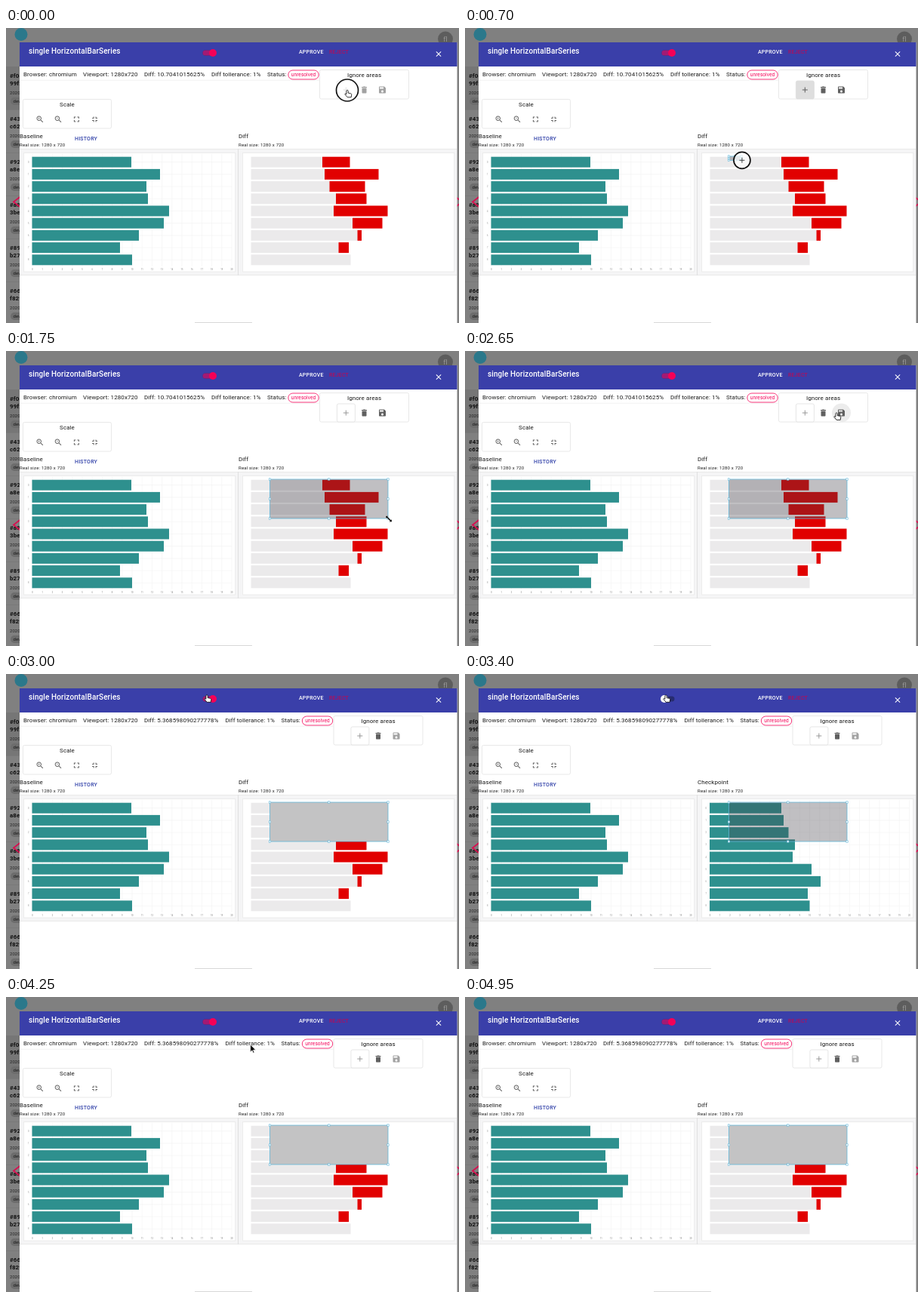
These frames come from a looping animation (600x391 px, 5050 ms). An HTML page:

```html
<!DOCTYPE html>
<html>
<head>
<meta charset="utf-8">
<style>
  html, body { margin: 0; width: 100%; height: 100%; overflow: hidden; background: #808080; }
  svg { display: block; width: 600px; height: 391px; font-family: Roboto, sans-serif; }
</style>
</head>
<body>
<svg viewBox="0 0 600 391"><g id="page"></g><g id="live"></g></svg>
<script>
const LOOP = 5050, STEP = 50;
const PINK = '#f50057', TEAL = '#2e908e', SHIFT = 18.5, RIGHT = 289.5;
const BASELINE = [166, 204, 186, 188, 216, 209, 176, 151, 167];
const CHECKPOINT = [129.5, 132.5, 139, 147.5, 144.5, 169.5, 181.5, 164.5, 167];

const LENS = 'M15.5 14h-.79l-.28-.27C15.41 12.59 16 11.11 16 9.5 16 5.91 13.09 3 9.5 3S3 5.91 3 9.5 5.91 16 9.5 16c1.61 0 3.09-.59 4.23-1.57l.27.28v.79l5 4.99L20.49 19l-4.99-5zm-6 0C7.01 14 5 11.99 5 9.5S7.01 5 9.5 5 14 7.01 14 9.5 11.99 14 9.5 14z';
const ICONS = {
  add: 'M19 13h-6v6h-2v-6H5v-2h6V5h2v6h6v2z',
  trash: 'M6 19c0 1.1.9 2 2 2h8c1.1 0 2-.9 2-2V7H6v12zM19 4h-3.5l-1-1h-5l-1 1H5v2h14V4z',
  save: 'M17 3H5c-1.11 0-2 .9-2 2v14c0 1.1.89 2 2 2h14c1.1 0 2-.9 2-2V7l-4-4zm-5 16c-1.66 0-3-1.34-3-3s1.34-3 3-3 3 1.34 3 3-1.34 3-3 3zm3-10H5V5h10v4z',
  zoomIn: LENS + 'M12 10h-2v2H9v-2H7V9h2V7h1v2h2v1z',
  zoomOut: LENS + 'M7 9h5v1H7z',
  expand: 'M7 14H5v5h5v-2H7v-3zm-2-4h2V7h3V5H5v5zm12 7h-3v2h5v-5h-2v3zM14 5v2h3v3h2V5h-5z',
  shrink: 'M5 16h3v3h2v-5H5v2zm3-8H5v2h5V5H8v3zm6 11h2v-3h3v-2h-5v5zm2-11V5h-2v5h5V8h-3z',
  close: 'M19 6.41L17.59 5 12 10.59 6.41 5 5 6.41 10.59 12 5 17.59 6.41 19 12 13.41 17.59 19 19 17.59 13.41 12z'
};
const CURSORS = {
  hand: '<path d="M0 0c1 0 1.2.6 1.2 1.2v2.4l3.4.7c.9.2 1.2.8 1.1 1.6l-.5 3.4H.2L-3 5.6c-.4-.6.3-1.4 1-1l.9.7V1.2C-1.1.6-.9 0 0 0z" fill="#fff" stroke="#000" stroke-width=".8"/>',
  arrow: '<path d="M0 0v10l2.3-2.2 1.5 3.5 1.5-.6-1.5-3.4h3.2z" stroke="#fff" stroke-width=".7"/>',
  cross: '<path d="M-3.5 0h7M0-3.5v7" stroke="#333" stroke-width=".9"/>',
  resize: '<path d="M-4-4h3.6l-1.2 1.2 4.4 4.4L4 .4V4H.4l1.2-1.2-4.4-4.4L-4-.4z" stroke="#fff" stroke-width=".4"/>'
};

// [time, x, y] and [start time, shape]
const PATH = [[0, 452, 82.5], [150, 452, 82.5], [550, 349, 170], [600, 349, 170], [1050, 491, 212],
  [1150, 489.5, 210.5], [1600, 506, 221.5], [1700, 507, 222.5], [2250, 507, 222.5], [2600, 492, 82],
  [2850, 492, 82], [2950, 266, 28], [3900, 266, 28], [4350, 332, 68], [4700, 332, 68], [4950, 515, 400], [LOOP, 515, 400]];
const SHAPES = [[0, 'hand'], [250, 'arrow'], [450, 'cross'], [1700, 'resize'], [2300, 'arrow'], [2550, 'hand'],
  [2900, 'arrow'], [2950, 'hand'], [3950, 'arrow']];
const PRESSES = [[0, 150], [600, 1700], [2700, 2800], [3150, 3250], [3600, 3690]];

const clamp = v => Math.max(0, Math.min(1, v));
const smooth = v => v * v * (3 - 2 * v);
const rect = (x, y, w, h, fill, extra = '') => `<rect x="${x}" y="${y}" width="${w}" height="${h}" fill="${fill}" ${extra}/>`;
const circle = (x, y, r, fill, extra = '') => `<circle cx="${x}" cy="${y}" r="${r}" fill="${fill}" ${extra}/>`;
const line = (d, stroke, width) => `<path d="${d}" fill="none" stroke="${stroke}" stroke-width="${width}"/>`;
const text = (x, y, s, size = 8, fill = '#1c1c1c', extra = '') =>
  `<text x="${x}" y="${y}" font-size="${size}" fill="${fill}" letter-spacing=".01em" ${extra}>${s}</text>`;
const icon = (name, x, y, fill = '#666') => `<path transform="translate(${x - 6} ${y - 6}) scale(.5)" d="${ICONS[name]}" fill="${fill}"/>`;
const MEDIUM = 'font-weight="500"', MIDDLE = 'text-anchor="middle"';
const frame = (x, y, w, h) => rect(x, y, w, h, '#fff', 'rx="2" stroke="#e2e2e2" stroke-width=".8"');
const caption = (x, s) => text(x, 146, s);
const bar = (i, from, to, fill) => rect(from, 170.7 + 16.2 * i, to - from, 14, fill);

function plot(dx, ends) {
  let out = '';
  for (let i = 0; i <= 20; i++) {
    const x = dx + 35 + 13.2 * i;
    out += line(`M${x} 167V316`, '#eee', .5) + text(x, 320.5, i, 2.6, '#777', MIDDLE);
  }
  ends.forEach((end, i) => {
    const y = 177.7 + 16.2 * i;
    out += line(`M${dx + 35} ${y}H${dx + 299}`, '#eee', .5) + text(dx + 29, y + 1, i, 2.6, '#888') + bar(i, dx + 34.5, dx + end, TEAL);
  });
  return out;
}

function diffPlot() {
  return BASELINE.map((end, i) => {
    const low = RIGHT + Math.min(end, CHECKPOINT[i]), high = RIGHT + Math.max(end, CHECKPOINT[i]);
    return bar(i, 324.5, low, '#ebeaeb') + bar(i, low, high, '#e10000');
  }).join('');
}

function sidebar() {
  const ids = [['#f0d', '99f2'], ['#43b', 'c62e'], ['#92c', 'a8e1'], ['#a8d', '3be0'], ['#89f', 'b27c'], ['#66a', 'f829']];
  return rect(0, 0, 18, 391, '#808080') + rect(0, 51, 18, 57, '#767676') + ids.map(([a, b], i) => {
    const y = 57 * i;
    return text(5, 66 + y, a, 8, '#111', 'font-weight="700"') + text(5, 76 + y, b, 8, '#111', 'font-weight="700"') +
      text(5, 87.5 + y, '2020', 6, '#222') + rect(6, 92 + y, 30, 10, '#6d6d6d', 'rx="5"') +
      text(9.5, 99 + y, 'dev', 6, '#1a1a1a') + line(`M0 ${108.5 + y}H18`, '#757575', .6);
  }).join('');
}

function page() {
  let out = rect(0, 0, 600, 391, '#808080') + sidebar() + circle(20, 8.5, 8.5, '#2b788b') +
    circle(582, 14.5, 10, '#5d5d5d') + text(582, 18, 'fl', 9, '#999', MIDDLE) +
    line('M19 223.5L10 230.5L19 237.5', '#d80f50', 1.8) + line('M595 223.5L604 230.5L595 237.5', '#d80f50', 1.8);
  out += rect(18, 19, 579.5, 372, '#fff') + rect(18, 19, 579.5, 32, '#3a3fa9') +
    text(30, 34, 'single HorizontalBarSeries', 10, '#fff', MEDIUM) +
    text(388, 34, 'APPROVE', 7, '#fff', MEDIUM + ' style="letter-spacing:.028em"') +
    text(428, 34, 'REJECT', 7, '#b00f5c', MEDIUM + ' style="letter-spacing:.028em"') + icon('close', 573, 34.5, '#fff');
  out += text(23, 64.3, 'Browser: chromium') + text(102, 64.3, 'Viewport: 1280x720');
  out += frame(22.5, 94.5, 117, 38.5) + text(81, 104, 'Scale', 8, '#1c1c1c', MIDDLE);
  ['zoomIn', 'zoomOut', 'expand', 'shrink'].forEach((name, i) => out += icon(name, 45 + 24.2 * i, 121));
  out += caption(18, 'Baseline') + text(91, 149, 'HISTORY', 7, '#3040a8', MEDIUM + ' style="letter-spacing:.028em"');
  for (const x of [18, 308]) {
    out += text(x, 156.7, 'Real size: 1280 x 720', 6, '#1c1c1c', 'style="letter-spacing:.033em"') +
      rect(x, 160, 289, 168, '#f5f5f6') + line(`M${x} 160.5H${x + 289}M${x} 327.5H${x + 289}`, '#e6e6e6', .8) +
      rect(x + 5.7, 165.5, 280, 157.5, '#fff', 'stroke="#e6e6e6" stroke-width=".7"');
  }
  return out + line('M307.5 160V328', '#e0e0e0', 1) + plot(0, BASELINE) + rect(250, 390, 76, 1, '#d8d8d8');
}

function toolbar(t, saved) {
  const dx = saved ? SHIFT : 0, drawing = t >= 100 && t < 1700;
  const faded = '#a2a2a2', dark = '#606060';
  let out = line(`M18 69.3H${415 + dx}`, '#ececec', .7) + text(183, 64.3, `Diff: ${saved ? '5.368598090277778' : '10.7041015625'}%`);
  out += `<g transform="translate(${dx})">` + text(272, 64.3, 'Diff tollerance: 1%') + text(346, 64.3, 'Status:') +
    rect(373.8, 56, 40.4, 12, '#fff', `rx="6" stroke="${PINK}" stroke-width=".8"`) +
    text(394, 64.4, 'unresolved', 6.5, PINK, MIDDLE) + frame(415.5, 55.5, 118, 38.5) +
    text(474.5, 65, 'Ignore areas', 8, '#1c1c1c', MIDDLE) +
    rect(438.4, 70, 24, 24, drawing ? '#dedede' : '#fff', 'rx="2" stroke="#dcdcdc" stroke-width=".7"');
  if (t >= 2500 && !saved) out += circle(498.5, 82, 12.5, '#ececec');
  return out + icon('add', 450.3, 82, drawing ? dark : '#999') + icon('trash', 474.5, 82, t < 600 ? faded : dark) +
    icon('save', 498.5, 82, t < 600 || saved ? faded : dark) + '</g>';
}

function toggle(t, on) {
  const pos = t < 3250 ? 1 : t < 3750 ? 1 - smooth(clamp((t - 3250) / 150)) : smooth(clamp((t - 3750) / 150));
  return rect(260.5, 29.5, 17, 7, '#272c70', 'rx="3.5"') + rect(260.5, 29.5, 17, 7, '#a31a74', `rx="3.5" opacity="${pos}"`) +
    circle(264 + 10 * pos, 33, 5, on ? PINK : '#fafafa');
}

function area(x2, y2, opaque) {
  const x = 349.5, y = 170, w = Math.max(0, x2 - x), h = Math.max(0, y2 - y);
  let out = rect(x, y, w, h, opaque ? '#c3c3c4' : 'rgba(66,62,70,.33)', 'stroke="#62b6d8" stroke-width=".8"');
  for (let i = 0; i < 9; i++) if (i !== 4)
    out += rect(x + w * (i % 3) / 2 - 1.2, y + h * Math.floor(i / 3) / 2 - 1.2, 2.4, 2.4, '#fff', 'stroke="#62b6d8" stroke-width=".6"');
  return out;
}

function pointerAt(t) {
  const i = PATH.findIndex(p => p[0] > t), [t0, x0, y0] = PATH[i - 1], [t1, x1, y1] = PATH[i];
  const k = smooth((t - t0) / (t1 - t0));
  return [x0 + (x1 - x0) * k, y0 + (y1 - y0) * k];
}

function pointer(t, x, y) {
  const press = PRESSES.find(([a, b]) => t >= a && t < b + STEP);
  const shape = SHAPES.filter(s => s[0] <= t).pop()[1];
  let ring = '';
  if (press) {
    const r = t >= press[1] ? 14.5 : 14.5 - 3.5 * clamp((t - press[0]) / 100);
    ring = circle(0, 0, r, 'rgba(255,255,255,.7)', 'stroke="#111" stroke-width="1.7"');
  }
  return `<g transform="translate(${x} ${y})">${ring}${CURSORS[shape]}</g>`;
}

function live(t) {
  const saved = t >= 2850, on = t < 3250 || t >= 3750, [x, y] = pointerAt(t);
  let out = toolbar(t, saved) + toggle(t, on) + caption(308, on ? 'Diff' : 'Checkpoint') +
    (on ? diffPlot() : plot(RIGHT, CHECKPOINT));
  if (t >= 600) out += t < 1700 ? area(x - 1, y, false) : area(506, 222, saved && on);
  return out + pointer(t, x, y);
}

const layer = document.getElementById('live');
let shown = -1;
document.getElementById('page').innerHTML = page();
function tick() {
  const t = Math.floor(performance.now() % LOOP / STEP) * STEP;
  if (t !== shown) layer.innerHTML = live(shown = t);
  requestAnimationFrame(tick);
}
tick();
</script>
</body>
</html>
```
